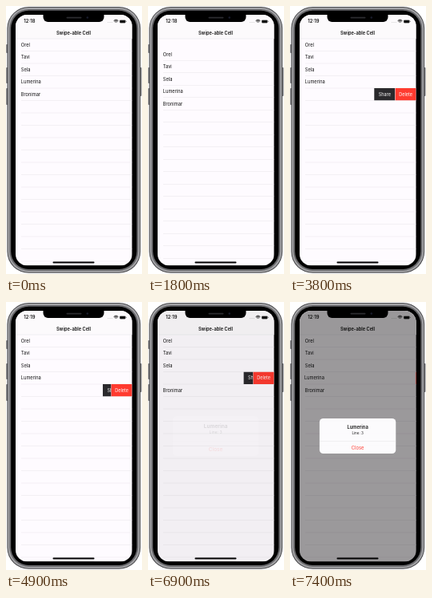
An HTML page with a canvas for the animation above (8000 ms loop, 170 px wide and 336 px high).

```html
<!DOCTYPE html>
<html lang="en">
<head>
<meta charset="utf-8">
<title>Swipe-able Cell</title>
<style>
html, body { margin: 0; width: 100%; height: 100%; overflow: hidden; background: #fff; }
canvas { display: block; width: 170px; height: 336px; }
</style>
</head>
<body>
<canvas id="stage"></canvas>
<script>
const W = 170, H = 336, LOOP = 8000, STEP = 100;
const SCREEN = { x: 12, y: 11, w: 145.7, h: 314.4, r: 14.5 };
const RIGHT = SCREEN.x + SCREEN.w;
const LIST_TOP = 41, ROW = 15.5, TEXT_X = 18.8, OPEN = 52.6;
const NAMES = ['Orel', 'Tavi', 'Sela', 'Lumerina', 'Bronimar'];
const RED = '#ff3b30', INK = '#111', PAPER = '#fefbff';

const canvas = document.getElementById('stage');
const ctx = canvas.getContext('2d');
const dpr = window.devicePixelRatio || 1;
canvas.width = W * dpr;
canvas.height = H * dpr;

const progress = (t, start, end) => Math.max(0, Math.min(1, (t - start) / (end - start)));
const smooth = p => p * p * (3 - 2 * p);

// Critically damped spring from 0 to 1; rate is per second.
function spring(t, start, rate = 10) {
  const x = Math.max(0, t - start) / 1000 * rate;
  return 1 - (1 + x) * Math.exp(-x);
}

function box(x, y, w, h, r, fill) {
  ctx.beginPath();
  ctx.roundRect(x, y, w, h, r);
  ctx.fillStyle = fill;
  ctx.fill();
}

function rect(x, y, w, h, fill) {
  ctx.fillStyle = fill;
  ctx.fillRect(x, y, w, h);
}

function label(str, x, y, size, { color = INK, weight = 400, align = 'left' } = {}) {
  ctx.font = `${weight} ${size}px Inter, "Liberation Sans", sans-serif`;
  ctx.textAlign = align;
  ctx.textBaseline = 'alphabetic';
  ctx.fillStyle = color;
  ctx.fillText(str, x, y);
}

function clipped(x, y, w, h, r, paint) {
  ctx.save();
  ctx.beginPath();
  ctx.roundRect(x, y, w, h, r);
  ctx.clip();
  paint();
  ctx.restore();
}

// Overscroll: a quick pull, then the list springs back.
function pullOffset(t) {
  const released = 1600;
  const pull = t < released ? smooth(progress(t, 1340, released)) : 1 - spring(t, released);
  return 29 * pull;
}

function swipeState(t) {
  if (t < 4750) return { row: 4, shift: OPEN * spring(t, 2780, 9), closing: false };
  if (t < 5700) return { row: 4, shift: OPEN * (1 - spring(t, 4790)), closing: true };
  if (t < 6750) return { row: 3, shift: OPEN * spring(t, 5760, 13), closing: false };
  return { row: 3, shift: OPEN * (1 - spring(t, 6798)), closing: true };
}

function drawActions(y, shift, closing) {
  const full = OPEN / 2;
  const left = RIGHT - shift;
  const split = RIGHT - (closing ? Math.min(full, shift) : shift / 2);
  const baseline = y + ROW / 2 + 2;
  const white = { color: '#fff', align: 'center' };
  clipped(left, y, split - left, ROW, 0, () => {
    rect(left, y, full, ROW, '#2b2a2d');
    label('Share', left + full / 2, baseline, 5.5, white);
  });
  clipped(split, y, RIGHT - split, ROW, 0, () => {
    rect(split, y, full, ROW, RED);
    label('Delete', split + full / 2, baseline, 5.5, white);
  });
}

function drawList(t) {
  const top = LIST_TOP + pullOffset(t);
  const swipe = swipeState(t);
  for (let i = 1; i < 20; i++) rect(19, top + i * ROW - 0.25, RIGHT - 19, 0.5, '#e6e4e9');
  NAMES.forEach((name, i) => {
    const y = top + i * ROW;
    const shift = i === swipe.row && swipe.shift > 0.3 ? swipe.shift : 0;
    label(name, TEXT_X - shift, y + 9.9, 5.7);
    if (shift) drawActions(y, shift, swipe.closing);
  });
}

function drawStatus(t) {
  label(t < 2000 ? '12:18' : '12:19', 22.3, 21.3, 5.8, { weight: 600 });
  for (let i = 0; i < 4; i++) box(127 + i * 1.7, 20.2, 0.9, 0.9, 0.45, '#aaa');
  ctx.strokeStyle = INK;
  ctx.lineWidth = 0.9;
  for (const r of [1.3, 2.7, 4]) {
    ctx.beginPath();
    ctx.arc(137.5, 21.3, r, -Math.PI * 0.75, -Math.PI * 0.25);
    ctx.stroke();
  }
  box(142, 17.4, 7.6, 4, 1.1, '#666');
  box(142.5, 17.9, 6.6, 3, 0.7, INK);
  box(150, 18.7, 0.6, 1.4, 0.3, '#666');
}

function drawAlert(t) {
  const shown = spring(t, 6840);
  if (!shown) return;
  rect(SCREEN.x, SCREEN.y, SCREEN.w, SCREEN.h, `rgba(0, 0, 0, ${0.4 * shown})`);
  const scale = 1.155 - 0.155 * shown;
  ctx.save();
  ctx.globalAlpha = shown;
  ctx.translate(84.6, 168);
  ctx.scale(scale, scale);
  box(-47.5, -22, 95, 44, 4.6, '#fefdff');
  rect(-47.5, 6.4, 95, 0.4, '#dddce0');
  label(NAMES[3], 0, -9, 5.8, { weight: 600, align: 'center' });
  label('Line: 3', 0, -2.3, 4.5, { align: 'center' });
  label('Close', 0, 16.9, 5.8, { color: RED, align: 'center' });
  ctx.restore();
}

function drawBody() {
  for (const [x, y, h] of [[0.3, 48, 11], [0.3, 77, 20], [0.3, 103, 21], [166.8, 77, 36]]) {
    box(x, y, 2.6, h, 0.8, '#66666a');
  }
  const layers = [[0, '#4a4a4d'], [1, '#a4a4a7'], [2.9, '#69696c'], [4.8, '#000']];
  for (const [inset, fill] of layers) {
    box(1.4 + inset, 1 + inset, 166.8 - 2 * inset, 333.8 - 2 * inset, 27 - inset, fill);
  }
}

function drawNotch() {
  box(46.5, 8, 76, 11.9, [0, 0, 6, 6], '#000');
  box(75.5, 13.7, 19, 1.7, 0.85, '#2c2c30');
  box(100.5, 13.2, 2.6, 2.6, 1.3, '#191c2c');
}

function draw(t) {
  ctx.setTransform(dpr, 0, 0, dpr, 0, 0);
  rect(0, 0, W, H, '#fff');
  drawBody();
  const { x, y, w, h, r } = SCREEN;
  clipped(x, y, w, h, r, () => {
    rect(x, y, w, h, PAPER);
    drawList(t);
    rect(x, y, w, LIST_TOP - y, '#fcfafc');
    rect(x, LIST_TOP - 0.2, w, 0.4, '#dddbe0');
    label('Swipe-able Cell', 84.5, 35.7, 5.7, { weight: 600, align: 'center' });
    drawStatus(t);
    box(58.5, 320.6, 52, 1.8, 0.9, '#000');
    drawAlert(t);
  });
  drawNotch();
}

const origin = performance.now();
function tick() {
  const elapsed = (performance.now() - origin) % LOOP;
  draw(Math.floor(elapsed / STEP) * STEP);
  requestAnimationFrame(tick);
}
tick();
</script>
</body>
</html>
```
